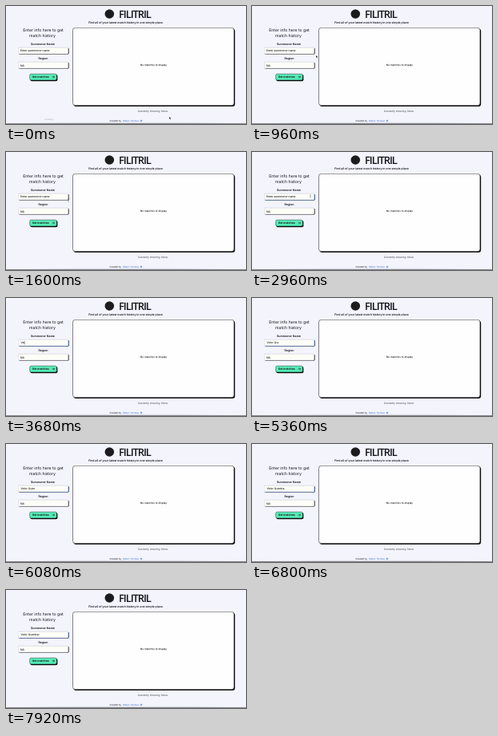
An HTML page for the animation above (8000 ms loop, 300 by 148 pixels).

```html
<!DOCTYPE html>
<html lang="en">
<head>
<meta charset="utf-8">
<title>Match history</title>
<style>
  html, body { margin: 0; width: 100%; height: 100%; overflow: hidden; background: #f4f4fd; }
  svg { display: block; width: 100vw; height: 100vh; }
  text { font-family: Inter, "Open Sans", sans-serif; fill: #141418; text-rendering: geometricPrecision; white-space: pre; }
  .mid { text-anchor: middle; }
  .brand { font: 600 13px "Open Sans", sans-serif; letter-spacing: -1.1px; }
  .tag { font-size: 3.5px; font-weight: 600; }
  .lead { font-size: 5.1px; }
  .label { font-size: 3.6px; font-weight: 600; }
  .value { font-size: 3.4px; font-weight: 500; }
  .bold { font-weight: 700; }
  .note { font-size: 3.15px; font-weight: 500; }
  .foot { font-size: 2.8px; }
  .soft { fill: #505058; }
  .link { fill: #2f6fd6; text-decoration: underline; }
  .ink { fill: #08080a; }
  .field { fill: #fefef8; stroke: #b4b4ba; stroke-width: .4; }

  .status, .focus, .cursor, .arrow, .beam { animation: 8s step-end infinite; }
  .status { animation-name: status; }
  .focus { animation-name: focus; fill: #2f62b4; }
  .cursor { animation-name: move; }
  .arrow { animation-name: arrow; }
  .beam { animation-name: beam; }

  @keyframes status { 0% { opacity: 1 } 1%, 100% { opacity: 0 } }
  @keyframes focus { 0% { opacity: 0 } 33%, 100% { opacity: 1 } }
  @keyframes arrow { 0% { opacity: 1 } 19%, 100% { opacity: 0 } }
  @keyframes beam { 0% { opacity: 0 } 19% { opacity: 1 } 40%, 100% { opacity: 0 } }
  @keyframes move {
    0% { transform: translate(204px, 139px) }
    6% { transform: translate(176px, 121px) }
    7% { transform: translate(136px, 97px) }
    8% { transform: translate(102px, 76px) }
    9% { transform: translate(84px, 66px) }
    12% { transform: translate(80px, 62px) }
    17% { transform: translate(78px, 59px) }
    24% { transform: translate(75px, 56px) }
    30%, 100% { transform: translate(73px, 54px) }
  }
</style>
</head>
<body>
<svg viewBox="0 0 300 148" preserveAspectRatio="none">
  <defs>
    <linearGradient id="fade">
      <stop offset="0" stop-color="#55555c" stop-opacity="0"/>
      <stop offset=".25" stop-color="#55555c"/>
      <stop offset=".75" stop-color="#55555c"/>
      <stop offset="1" stop-color="#55555c" stop-opacity="0"/>
    </linearGradient>
  </defs>
  <rect width="300" height="148" fill="#f4f4fd"/>
  <rect x="20" y="146" width="260" height="1" fill="url(#fade)" opacity=".15"/>
  <rect y="147" width="300" height="1" fill="#85858c"/>

  <circle cx="129.3" cy="10" r="5.8" fill="#1c1c1f"/>
  <text class="brand" x="141" y="15">FILITRIL</text>
  <text class="tag mid" x="149.5" y="22.2">Find all of your latest match history in one simple place</text>

  <text class="lead mid" x="46.5" y="31.8">Enter info here to get</text>
  <text class="lead mid" x="45.5" y="38.6">match history</text>

  <text class="label mid" x="46" y="49.2">Summoner Name</text>
  <rect class="ink" x="16" y="53" width="62.6" height="7.4" rx=".8"/>
  <rect class="focus" x="16" y="53" width="62.6" height="7.4" rx=".8"/>
  <rect class="field" x="15.2" y="52.2" width="62.6" height="7.8" rx=".8"/>
  <text class="value" id="hint" x="18" y="57.3">Enter summoner name</text>
  <text class="value" id="typed" x="18.5" y="57.3"></text>
  <rect id="caret" y="54.2" width=".5" height="4" fill="#141418"/>

  <text class="label mid" x="46.5" y="67.3">Region</text>
  <rect class="ink" x="16" y="71" width="62.6" height="7.4" rx=".8"/>
  <rect class="field" x="15.2" y="70.2" width="62.6" height="7.8" rx=".8"/>
  <text class="value" x="18" y="75.5">NA</text>

  <rect class="ink" x="30.4" y="86" width="34" height="8.2" rx="1.8"/>
  <rect x="29.7" y="85.2" width="33.6" height="7.8" rx="1.8" fill="#55ebb6" stroke="#08080a" stroke-width=".4"/>
  <text class="value bold" x="32.7" y="90.3">Get matches</text>
  <path d="M57.6 89h3m-1.2-1.2 1.2 1.2-1.2 1.2" fill="none" stroke="#141418" stroke-width=".6"/>

  <rect class="ink" x="84.5" y="28.5" width="201.7" height="97.4" rx="3"/>
  <rect x="83.5" y="27.3" width="201.5" height="97.4" rx="3" fill="#fefefe" stroke="#08080a" stroke-width=".5"/>
  <text class="note mid" x="184.5" y="74.8">No matches to display</text>

  <text class="note mid soft" x="183.5" y="133.2">Currently showing: None</text>
  <text class="foot" x="129.5" y="145">Created by</text>
  <text class="foot link" x="146" y="145">Maren Tolvikas</text>
  <circle cx="169" cy="144" r="1.3" fill="#8fa9d6"/>
  <text class="foot status" x="48" y="143" fill-opacity=".35">Loading...</text>

  <g class="cursor">
    <path class="arrow" d="M0 0v3l.8-.7.5 1.2.6-.3-.5-1.1h1z" fill="#111" stroke="#fff" stroke-width=".2"/>
    <path class="beam" d="M-.7 0h1.4M0 0v3M-.7 3h1.4" fill="none" stroke="#333" stroke-width=".4"/>
  </g>
</svg>
<script>
  const LOOP = 8000, FOCUS = 2640;
  const NAME = "Velor Quimbar";
  const KEYS = [3200, 3520, 4080, 4240, 4400, 5040, 5120, 5200, 5280, 6080, 6320, 6560, 7200];
  const [hint, typed, caret] = ["hint", "typed", "caret"].map(id => document.getElementById(id));

  function draw() {
    const t = performance.now() % LOOP;
    const count = KEYS.filter(k => k <= t).length;
    const beat = t % 1000;
    typed.textContent = NAME.slice(0, count);
    hint.style.opacity = count ? 0 : 1;
    caret.setAttribute("x", 18.6 + (count ? typed.getComputedTextLength() : -.5));
    caret.style.opacity = t > FOCUS && beat >= 400 && beat < 700 ? 1 : 0;
    requestAnimationFrame(draw);
  }
  draw();
</script>
</body>
</html>
```
